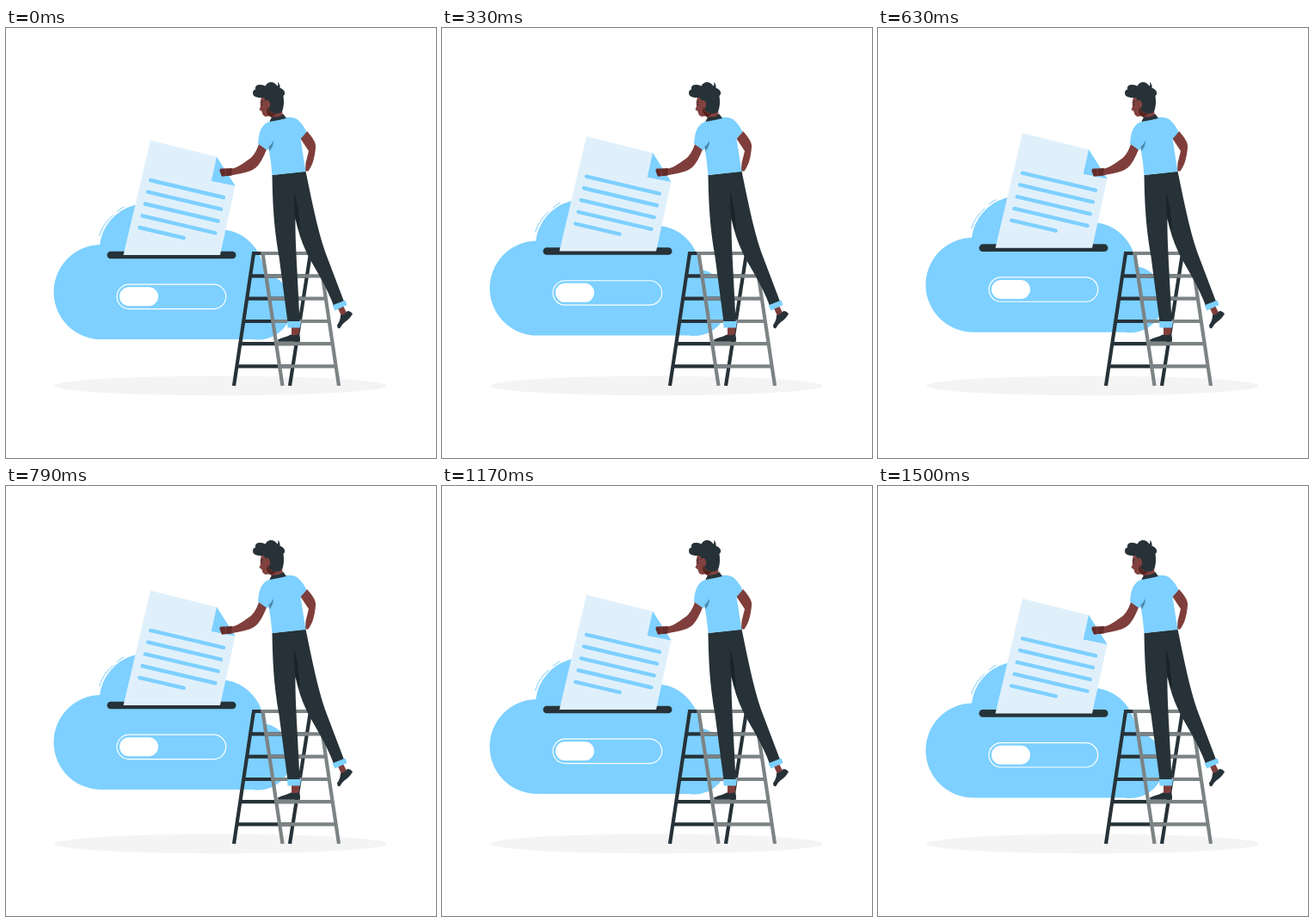
An HTML page for the animation above (1.54 s loop, 500x500 px).

```html
<!DOCTYPE html>
<html lang="en">
<head>
<meta charset="utf-8">
<title>Cloud upload</title>
<style>
  html, body { margin: 0; height: 100%; overflow: hidden; background: #fff; }
  svg { display: block; width: 100%; height: 100%; }
  .blue { fill: #7dd0ff; }
  .dark { fill: #263238; }
  .skin { fill: #7f3e3b; }
  .line { fill: none; stroke: #7dd0ff; stroke-linecap: round; }
  .ladder { fill: none; stroke-width: 4.2; }
</style>
</head>
<body>
<svg viewBox="0 0 500 500">
  <ellipse cx="249.500" cy="416" rx="193.500" ry="11.300" fill="#f4f4f4"/>

  <g id="cloud">
    <path class="blue" d="M112 362a55 55 0 0 1-3-110A55 55 0 0 1 206 224L246 234A53 53 0 0 1 300 285A39 39 0 0 1 287 362Z"/>
    <path class="line" stroke-width="1" d="M108.500 241.500Q113 227.500 124 218M129 213.500Q133 210 137 208"/>
    <rect class="dark" x="117.500" y="259.700" width="150" height="8.600" rx="4.300"/>
    <path fill="#e0f0fb" d="M168 130.500L245 149.700L266.500 183.500L249 264H136.500Z"/>
    <path class="blue" d="M245 149.700L266.500 183.500L238.700 178Z"/>
    <path class="line" stroke-width="4.400" d="M168 177l85 20M165 190.700l85 20M161.700 204.500l85 20M158.500 218.300l85 20M155.200 232l51.500 12"/>
    <rect x="129" y="298.200" width="126.700" height="28.400" rx="14.200" fill="none" stroke="#fff" stroke-width="1.200"/>
    <rect x="132" y="301.300" width="45" height="22" rx="11" fill="#fff"/>
  </g>

  <path class="ladder" stroke="#263238" d="M265 416L288 262H354L330 416M284 288.400H350M280 314.700H346M276 341H342M272 367.200H338M268 393.400H334"/>
  <path class="ladder" stroke="#7c8385" d="M321.500 416L298.500 262H364L387 416M302 288.400H368M306 314.700H372M310 341H376M314 367.200H380M318 393.400H383"/>

  <!-- feet -->
  <path class="skin" d="M332 347H341.500L340.500 358H332ZM386 326L392 323L396 331L390 335Z"/>
  <path class="dark" d="M316 362.500C321 360 327 359 331 356.500Q336 358 341 356Q342.500 360 342 364.800H316.500ZM385 345.500Q389 340 389 334Q394 333 397 329Q401 329 403 332.500Q399 339 394 342Q390 345 388 349.500L385.500 348.500Z"/>

  <!-- trousers -->
  <path class="dark" d="M309.500 171L348.500 166.500C355 198 362 234 371 260L393 318L381 323C372 298 356 275 349 260Q341 243 336.500 222C336 250 340 300 341.500 342H327.500L317.500 266C311 230 310 200 309.500 171Z"/>
  <path fill="#1a2327" d="M335 190Q340 205 342 236Q337 226 335.500 213Z"/>
  <path class="blue" d="M327 341H343L342 348.500H327.500ZM379.500 322.500L394.500 316.500L396.500 322L382.500 328.500Z"/>

  <!-- arms and hand -->
  <path class="skin" d="M294 135C291 144 287 150 282 153C275 158 270 162 263 163.500L249 163.500L248.500 166L251 172.500L262 171.500C273 169 284 168 291 162C296 157 300 149 303 141ZM350 120C356 127 361 133 360 139C359 150 357 159 351.500 166.500H348L348.500 157L352 143L342 128Z"/>
  <path fill="#632c2a" d="M248.500 166L250 164L263 163L262 171.500L251 172.500Z"/>
  <path d="M255 164L255.500 172" stroke="#944e49" stroke-width=".6"/>

  <!-- shirt -->
  <path class="blue" d="M307 108.500L326 104Q335 103 340 107.500Q346 113 349.500 121L342.500 129L348.500 167L309.500 171Q308 154 305.500 140L303.500 142L293 134.500Q294 119 299 114Q302 110 307 108.500Z"/>
  <path fill="#4c8bb0" d="M311 131Q309 135 305.500 138L306 143Q311 139 311 131Z"/>

  <!-- head -->
  <path class="skin" fill-opacity=".98" d="M297 80Q295 88 296 91L294.500 95L297.500 97Q298 102 302 103L309 102L308 107L322 102L319 84L304 76Z"/>
  <path fill="#55231f" d="M304 92Q305 100 314 99L309 104Q304 102 303 96Z"/>
  <path class="dark" d="M306.500 109Q308 104 311 103.500Q318 104 322.500 100L326 105Q318 107 306.500 109ZM300 81Q296 81 294 81Q287 80 287 75.500Q287 72 290 71.500Q289 66 295 66Q299 65.500 301.500 67.500Q304 62.500 309 63Q313 63.500 315.500 67.500Q317 66 316 63Q319 65 318.500 69.500Q325 72 324 77L322.500 79Q324 88 321.500 96Q318 101 312 99Q306 98 305 94Q309 90 306 85Q303 82 302 85Z"/>
  <path class="dark" d="M295.800 86L299 85.300L299 86.300L296 87Z"/>
  <circle class="dark" cx="298" cy="89.500" r=".8"/>
</svg>
<script>
  const cloud = document.getElementById('cloud');
  const LOOP = 1540, FPS = 24, TURN = 735, SPEED = 1 / 75;

  // Linear float: up until TURN, then back down, stepped at 24 fps.
  function draw(now) {
    const step = Math.floor((now % LOOP) * FPS / 1000 + 0.08);
    const t = step * 1000 / FPS;
    const y = (Math.abs(t - TURN) - TURN) * SPEED;
    cloud.setAttribute('transform', `translate(0 ${y.toFixed(2)})`);
  }

  let start;
  function tick(now) {
    start ??= now;
    draw(now - start);
    requestAnimationFrame(tick);
  }
  draw(0);
  requestAnimationFrame(tick);
</script>
</body>
</html>
```
